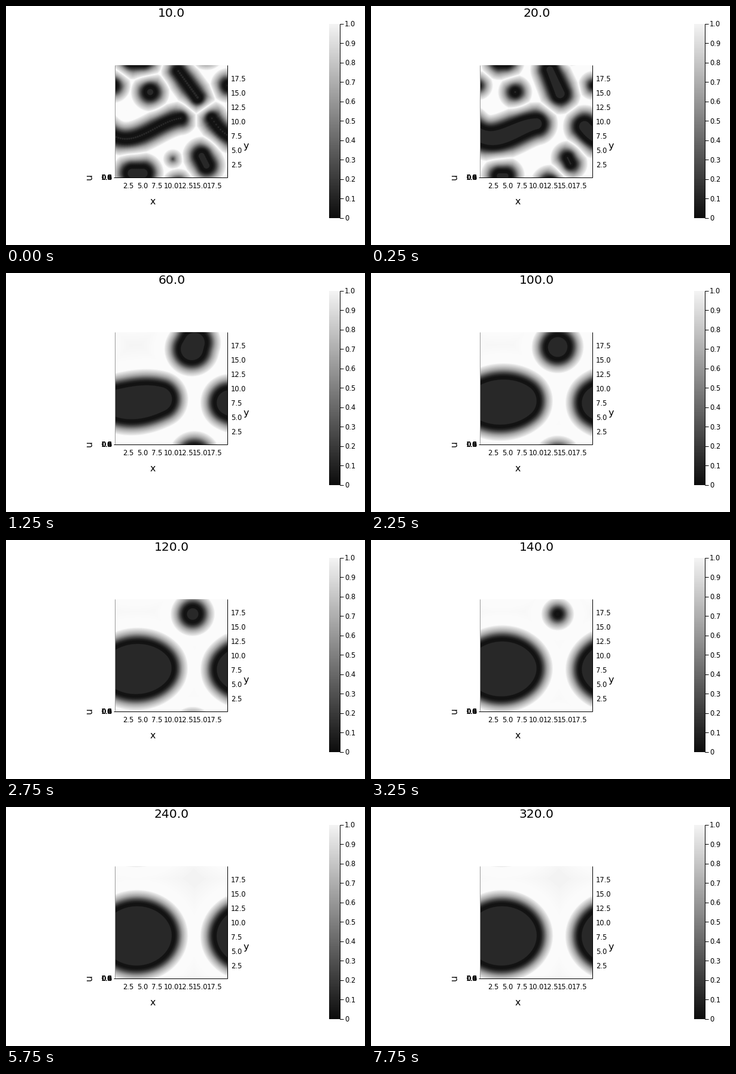
Write a matplotlib script that moves like this. It is 600 px wide and 400 px high and loops after 8 s.

```python
import numpy as np
import matplotlib.pyplot as plt
from matplotlib.animation import FuncAnimation

W, H, DPI = 600, 400, 100
FRAMES, INTERVAL = 32, 250
LEFT, TOP, SIDE = 183, 99, 188      # plot box in pixels
PERIOD = 192                        # the domain wraps in both directions
RING, HALO = 14, 28                 # core edge to mid grey, and to white
SETTLED = 160                       # nothing moves after this time

# small early spots: x, y, half axis dx, dy, core radius, drift in y
SPOTS = [
    (241, 144, 0, 0, 5, 0),
    (179, 133, 0, 0, 2, 0),
    (279, 256, 0, 0, -11, 0),
    (220, 280, 9, 0, 7.5, 0.43),
    (331, 259, 4, 8, 5, 0),
]

# grey level against distance from the core's edge
DIST = [-0.5, 0.7, 5, 8, 12, 15, 18, 22, 26, 28, 45, 70]
GREY = [40, 20, 18, 35, 82, 126, 165, 200, 230, 251, 250, 244]

px = np.arange(SIDE) + 0.5
gx, gy = np.meshgrid(LEFT + px, TOP + px)


def core(area):
    """Core radius for a blob's squared radius; sinks fast once used up."""
    return np.sqrt(max(area, 0)) - RING + 0.3 * min(area, 0)


def decay(age, tau):
    return np.exp(-age / tau)


def segment(a, b, ra, rb, n=14):
    k = np.linspace(0, 1, n)[:, None]
    return np.array([*a, ra]) * (1 - k) + np.array([*b, rb]) * k


def big_blob(age):
    """An S-shaped streak that thickens and rounds off to an ellipse."""
    r = 1.5 + 2.9 * age ** 0.56
    half = 58 - 0.75 * r + 13 * decay(age, 15)
    s = np.linspace(-1, 1, 40)
    bend, slow = decay(age, 20), decay(age, 60)
    x = 218.5 + 3.5 * bend + half * s
    y = (215.5 + 2.5 * slow - 7 * slow * (1 - bend) * s
         - bend * (30 * s**2 + 26 * (s - s**3)))
    return np.column_stack([x, y, r * (1 - 0.25 * s**2)])


def top_blob(t):
    """A slanted streak that turns, contracts to a disc and vanishes."""
    grow = min((t - 10) / 30, 1)
    q = decay(max(t - 40, 0), 18)
    centre = np.array([312, 124])
    tail = centre + q * np.array([9, -22])
    head = centre + q * np.array([-4, 10])
    tail = (1 - grow) * np.array([288, 109]) + grow * tail
    head = (1 - grow) * np.array([320, 153]) + grow * head
    r = min(2 + 16.5 * grow, core(17.6 * (151 - t)))
    return segment(tail, head, r * (1 - 0.25 * q), r)


def spot(age, x, y, dx, dy, r, drift):
    r = core((r + RING) ** 2 - 13 * age)
    y += drift * age
    shrink = decay(age, 20)
    axis = np.array([dx, dy]) * shrink
    return segment((x, y) - axis, (x, y) + axis, r, r, 6)


def blobs(t):
    age = t - 10
    found = [big_blob(age), top_blob(t)] + [spot(age, *s) for s in SPOTS]
    return [b for b in found if b[:, 2].max() > -HALO]


def distance(circles, dx, dy):
    best = np.full(gx.shape, 200.0)
    for x, y, r in circles:
        x, y = x + dx, y + dy
        # skip copies too far off the box to show
        gap = np.hypot(max(LEFT - x, x - LEFT - SIDE, 0),
                       max(TOP - y, y - TOP - SIDE, 0))
        if gap - r < 80:
            np.minimum(best, np.hypot(gx - x, gy - y) - r, out=best)
    return best


def picture(t):
    shifts = (-PERIOD, 0, PERIOD)
    layers = [distance(b, dx, dy)
              for b in blobs(t) for dx in shifts for dy in shifts]
    near, second = np.partition(np.array(layers), 1, axis=0)[:2]
    # rims squeezed between neighbours still reach white where they meet
    ridge = np.clip((near + second) / 2, 12, HALO)
    squeezed = 6 + (near - 6) * (HALO - 6) / (ridge - 6)
    return np.interp(np.where(near > 6, squeezed, near), DIST, GREY)


plt.rcParams["font.family"] = "DejaVu Sans"
fig = plt.figure(figsize=(W / DPI, H / DPI), dpi=DPI, facecolor="white")
ax = fig.add_axes([0, 0, 1, 1])


def label(x, y, text, size, ha="center", **kw):
    """Text with its baseline at y; size in pixels."""
    kw.setdefault("va", "baseline")
    return ax.text(x, y, text, fontsize=size * 72 / DPI, ha=ha, **kw)


def line(xs, ys, color="black"):
    ax.plot(xs, ys, color=color, lw=72 / DPI, solid_capstyle="butt")


def grey_image(data, x0, x1, y0, y1):
    return ax.imshow(data, cmap="gray", vmin=0, vmax=255,
                     extent=(x0, x1, y1, y0), aspect="auto",
                     interpolation="nearest")


surface = grey_image(picture(10), LEFT, LEFT + SIDE, TOP, TOP + SIDE)
line([182, 182], [99, 287], "#999999")
line([370, 370], [99, 287])
line([182, 370], [287, 287])
line([180, 183], [287, 287])

TICK = 11.55
for n in range(1, 8):
    value = f"{2.5 * n:.1f}"
    label(180.5 + 24.05 * n, 304.8, value, TICK)
    label(376.2, 293.6 - 24 * n, value, TICK, ha="left")
for n in range(6):
    label(177, 291, f"{n / 5:.1f}", TICK, ha="right")

label(245.5, 332, "x", 15.9)
label(401, 238.5, "y", 15.9)
label(139, 286, "u", 15.9, rotation=90, va="center")

grey_image(np.linspace(243, 12, 325)[:, None], 540, 558, 30, 355)
line([558, 558], [30, 355])
for n in range(11):
    y = 354.9 - 32.5 * n
    line([558, 564], [y, y])
    label(566, y + 4.3, f"{n / 10:.1f}" if n else "0", TICK, ha="left")

title = label(276.9, 18.5, "10.0", 20.3)

ax.set_xlim(0, W)
ax.set_ylim(H, 0)
ax.axis("off")


def update(i):
    t = 10 * (i + 1)
    if t <= SETTLED:
        surface.set_data(picture(t))
    title.set_text(f"{t:.1f}")
    return surface, title


def reset():
    return update(0)


anim = FuncAnimation(fig, update, frames=FRAMES, init_func=reset,
                     interval=INTERVAL, repeat=True, repeat_delay=0)
plt.show()
```
